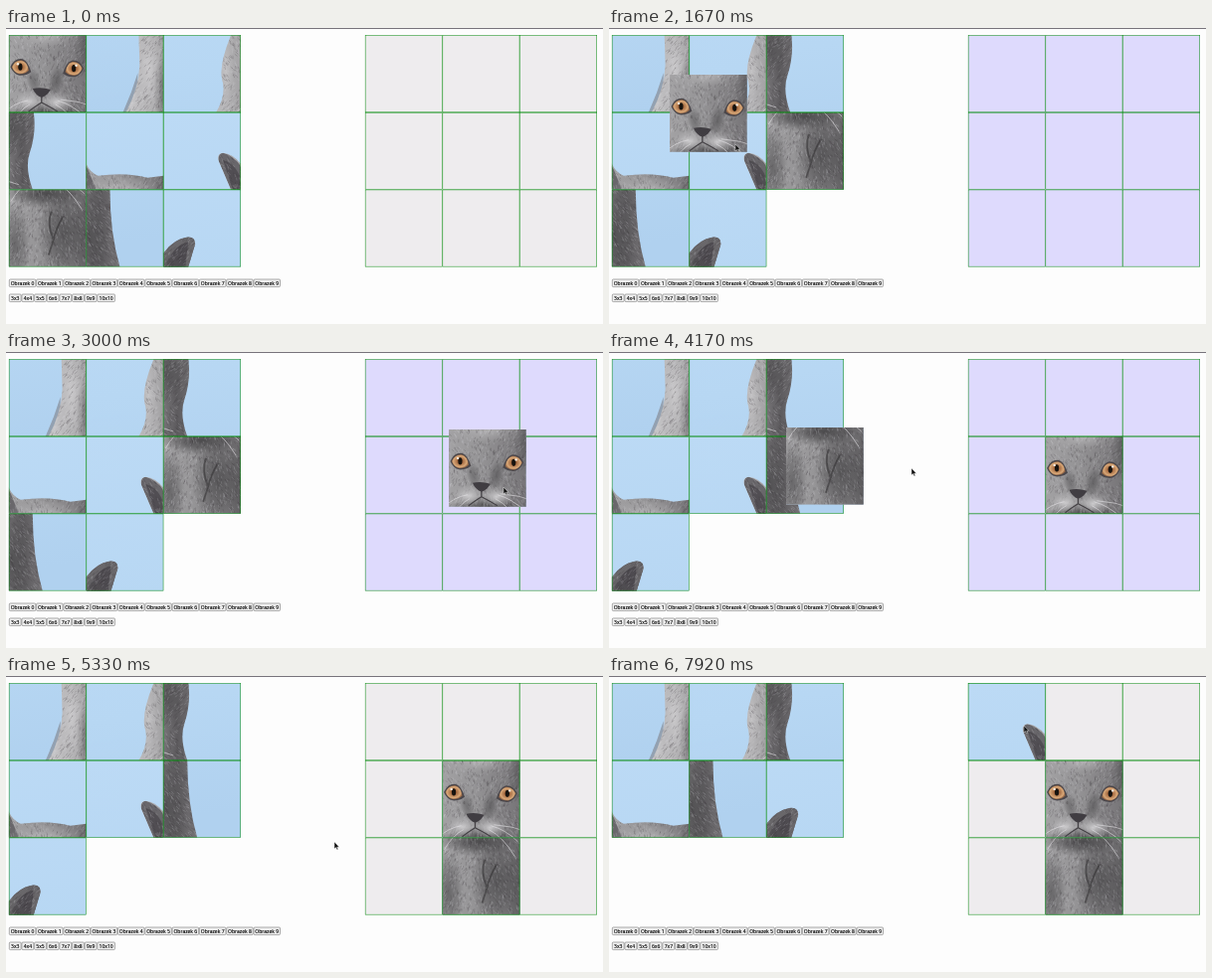
Recreate the animation shown at these times as an HTML page. Size 600 by 298 pixels, loop 8 s.

```html
<!DOCTYPE html>
<html lang="pl">
<head>
<meta charset="utf-8">
<title>Puzzle</title>
<style>
  html, body { margin: 0; width: 100%; height: 100%; overflow: hidden; background: #fdfdfd; }
  #stage { display: block; width: 600px; height: 298px; }
  .border { fill: none; stroke: #008a08; stroke-width: .5; }
  .button rect { fill: #efefef; stroke: #777; stroke-width: .6; }
  .button text { font: 5px "Noto Sans", "Open Sans", sans-serif; fill: #000; stroke: #000; stroke-width: .12; text-anchor: middle; }
  .hair { fill: none; stroke-width: .7; stroke-linecap: round; }
</style>
</head>
<body>
<svg id="stage" viewBox="0 0 600 298">
  <defs>
    <linearGradient id="sky" x2=".15" y2="1">
      <stop stop-color="#bcdaf5"/><stop offset=".5" stop-color="#b7d7f3"/><stop offset="1" stop-color="#b0d1ef"/>
    </linearGradient>
    <linearGradient id="fur" gradientUnits="userSpaceOnUse" x1="46" x2="190">
      <stop stop-color="#c4c3c5"/><stop offset=".22" stop-color="#a3a2a4"/>
      <stop offset=".45" stop-color="#949395"/><stop offset=".76" stop-color="#777578"/>
      <stop offset=".86" stop-color="#5d5b5e"/><stop offset="1" stop-color="#757376"/>
    </linearGradient>
    <radialGradient id="shade">
      <stop stop-color="#4b4a4c"/><stop offset=".5" stop-color="#555456" stop-opacity=".7"/>
      <stop offset="1" stop-color="#59585a" stop-opacity="0"/>
    </radialGradient>
    <radialGradient id="glow">
      <stop stop-color="#cbcacc"/><stop offset="1" stop-color="#b4b3b5" stop-opacity="0"/>
    </radialGradient>
    <radialGradient id="iris">
      <stop offset=".3" stop-color="#a4683f"/><stop offset=".8" stop-color="#d8a878"/><stop offset="1" stop-color="#9a6a48"/>
    </radialGradient>
    <path id="body" d="M56 50Q53 42 60 41Q70 42 78 52Q82 61 90 64Q118 60 140 66L156 64Q166 50 180 48Q188 47 188 55L181 78Q184 98 177 119Q172 134 180 156Q180 200 190 234H40Q53 210 54 186L53 156Q64 138 59 122Q56 108 68 78Z"/>
    <clipPath id="bodyClip"><use href="#body"/></clipPath>
    <g id="eye">
      <path d="M-10 0Q-6-9 2-8Q8-6 11 5Q6 9-1 8.5Q-7 7-10 0Z" fill="#4a464a"/>
      <path d="M-8.6 0Q-5-7.4 1.5-6.6Q7-5 8.6 3.6Q5 7.4-1 7.2Q-6 6-8.6 0Z" fill="url(#iris)"/>
      <ellipse rx="2.1" ry="3.6" fill="#17130f"/>
      <circle cx="-2.4" cy="-3" r="1.2" fill="#f6eee4"/>
    </g>
    <g id="cat">
      <rect width="234" height="234" fill="url(#sky)"/>
      <path d="M37 234Q46 214 52 194V234Z" fill="#93a1b1"/>
      <use href="#body" fill="url(#fur)"/>
      <g clip-path="url(#bodyClip)">
        <path d="M56 50Q54 42 60 41Q72 44 80 58L88 78H68Z" fill="#69676b"/>
        <path d="M60 48Q70 51 76 62L78 78H70Z" fill="#514e53"/>
        <path d="M156 65Q168 49 182 48Q188 49 188 55L181 82H156Z" fill="#69676a"/>
        <path d="M159 74Q168 55 181 53L178 78H162Z" fill="#4e4b50"/>
        <ellipse cx="116" cy="78" rx="38" ry="15" fill="url(#glow)" opacity=".6"/>
        <ellipse cx="63" cy="115" rx="9" ry="42" fill="url(#glow)" opacity=".7"/>
        <ellipse cx="63" cy="190" rx="16" ry="54" fill="url(#glow)"/>
        <ellipse cx="117" cy="160" rx="42" ry="15" fill="url(#shade)"/>
        <ellipse cx="134" cy="200" rx="28" ry="48" fill="url(#shade)" opacity=".8"/>
        <ellipse cx="84" cy="212" rx="16" ry="45" fill="url(#shade)" opacity=".65"/>
        <ellipse cx="160" cy="205" rx="20" ry="65" fill="url(#shade)" opacity=".75"/>
        <ellipse cx="160" cy="92" rx="16" ry="32" fill="url(#shade)" opacity=".7"/>
        <path id="darkHair" class="hair" stroke="#343235" opacity=".28"/>
        <path id="lightHair" class="hair" stroke="#e2e1e3" opacity=".24"/>
        <path d="M121 178Q116 190 123 207M133 183Q126 194 123 207L118 222" fill="none" stroke="#343235" stroke-width="1.8" opacity=".6"/>
        <ellipse cx="103" cy="124" rx="7" ry="15" fill="url(#shade)" opacity=".5" transform="rotate(-14 103 124)"/>
        <ellipse cx="126" cy="124" rx="8" ry="16" fill="url(#shade)" opacity=".6" transform="rotate(14 126 124)"/>
        <ellipse cx="98" cy="145" rx="17" ry="11" fill="url(#glow)"/>
        <ellipse cx="126" cy="146" rx="17" ry="11" fill="url(#glow)"/>
        <path d="M102 132Q111 130 120 133Q117 139 111 141Q105 139 102 132Z" fill="#403d42"/>
        <path d="M111 140V146Q106 149 98 155M111 146Q117 149 127 155" fill="none" stroke="#454246" stroke-width="1.3"/>
        <path d="M97 144Q84 146 72 157M99 148Q88 154 80 168M127 144Q142 148 154 160M125 148Q139 155 151 175M130 143Q149 144 166 151" fill="none" stroke="#e6e5e7" stroke-width=".6"/>
      </g>
      <use href="#eye" x="89.5" y="110"/>
      <use href="#eye" transform="translate(143.5 111.5) scale(-1 1)"/>
    </g>
  </defs>
  <rect width="600" height="298" fill="#fdfdfd"/>
  <rect width="600" height="1" fill="#77737b"/>
  <g id="cells"></g>
  <g id="buttons"></g>
  <g id="tiles"></g>
  <path id="cursor" d="M0 0V7L1.6 5.6L2.7 8L3.8 7.5L2.7 5.2H4.9Z" fill="#111" stroke="#fff" stroke-width=".4"/>
</svg>
<script>
const SIZE = 77.7, TOP = 7.3, LEFT = 2.9, RIGHT = 360.9;
const STEPS = 96, LOOP = 8000;
const byId = id => document.getElementById(id);

function add(parent, tag, attrs = {}) {
  const node = document.createElementNS("http://www.w3.org/2000/svg", tag);
  for (const key in attrs) node.setAttribute(key, attrs[key]);
  return parent.appendChild(node);
}
const addBorder = (parent, x = 0, y = 0) => add(parent, "rect",
  { class: "border", x: x + .25, y: y + .25, width: SIZE - .5, height: SIZE - .5 });
const slot = (left, i) => [left + i % 3 * SIZE, TOP + Math.floor(i / 3) * SIZE];

// Short seeded fur strokes
let seed = 7;
const random = () => (seed = seed * 16807 % 2147483647) / 2147483647;
function hairs(count) {
  let d = "";
  for (let i = 0; i < count; i++) {
    const x = 40 + random() * 152, y = 42 + random() * 192;
    const dx = (x - 112) * .03 + random() * 2 - 1, dy = (y < 125 ? -1 : 1) * (1 + random() * 2);
    d += `M${x.toFixed(1)} ${y.toFixed(1)}l${dx.toFixed(1)} ${dy.toFixed(1)}`;
  }
  return d;
}
byId("darkHair").setAttribute("d", hairs(2000));
byId("lightHair").setAttribute("d", hairs(1600));

const cells = Array.from({ length: 9 }, (_, i) => {
  const [x, y] = slot(RIGHT, i);
  const cell = add(byId("cells"), "rect", { x, y, width: SIZE, height: SIZE });
  addBorder(byId("cells"), x, y);
  return cell;
});

function addButton(x, y, width, label) {
  const g = add(byId("buttons"), "g", { class: "button" });
  add(g, "rect", { x: x + .4, y, width: width - .8, height: 7.6, rx: 1 });
  add(g, "text", { x: x + width / 2, y: y + 5.6 }).textContent = label;
}
for (let i = 0; i < 10; i++) addButton(2.9 + i * 27.3, 253, 27.3, "Obrazek " + i);
for (let n = 3; n <= 10; n++) addButton(2.9 + (n - 3) * 12.65, 268, n < 10 ? 12.65 : 18.4, `${n}x${n}`);

// Picture part held by each tile, in starting order
const parts = [4, 6, 3, 5, 1, 0, 7, 8, 2];
const tiles = parts.map(part => {
  const group = add(byId("tiles"), "g");
  const view = add(group, "svg", {
    width: SIZE, height: SIZE, viewBox: `${part % 3 * 78} ${Math.floor(part / 3) * 78} 78 78`
  });
  add(view, "use", { href: "#cat" });
  return { part, group, border: addBorder(group), drag: null };
});

// Rows are [step, x, y]; a drag lasts from its first row to its last
const drags = [
  { tile: 0, path: [[17, 2.9, 7.3], [20, 61, 47], [30, 330, 74], [36, 445, 78], [39, 440, 84]] },
  { tile: 6, path: [[49, 158.3, 85], [50, 178, 76], [51, 262, 82], [60, 440, 166], [61, 439, 165]] },
  { tile: 5, path: [[79, 80.6, 85], [80, 82, 85], [91, 361, 9], [93, 361, 7.5]] }
];
for (const drag of drags) {
  tiles[drag.tile].drag = drag;
  drag.start = drag.path[0][0];
  drag.end = drag.path.at(-1)[0];
}
const cursorPath = [
  [0, 98, 310], [1, 98, 284], [10, 98, 262], [15, 62, 72], [17, 62, 72], [20, 127, 117],
  [30, 386, 134], [36, 500, 136], [39, 498, 144], [42, 470, 140], [48, 198, 124], [49, 205, 123],
  [50, 304, 117], [60, 495, 205], [61, 492, 208], [64, 330, 167], [70, 150, 140], [79, 145, 130],
  [80, 146, 130], [91, 418, 52], [95, 417, 50]
];

function at(path, step) {
  const i = path.findIndex(row => row[0] > step);
  if (i < 0) return path.at(-1).slice(1);
  if (i === 0) return path[0].slice(1);
  const [a, ax, ay] = path[i - 1], [b, bx, by] = path[i];
  const k = (step - a) / (b - a);
  return [ax + (bx - ax) * k, ay + (by - ay) * k];
}
const move = (node, [x, y]) => node.setAttribute("transform", `translate(${x.toFixed(2)} ${y.toFixed(2)})`);

function draw(step) {
  let next = 0, dragging = false;
  for (const { part, group, border, drag } of tiles) {
    const held = drag && step >= drag.start && step < drag.end;
    if (held) {
      dragging = true;
      move(group, at(drag.path, step));
      byId("tiles").append(group);
    } else {
      move(group, drag && step >= drag.end ? slot(RIGHT, part) : slot(LEFT, next++));
    }
    border.setAttribute("visibility", held ? "hidden" : "visible");
  }
  for (const cell of cells) cell.setAttribute("fill", dragging ? "#dedafd" : "#eeecee");
  move(byId("cursor"), at(cursorPath, step));
}

const began = performance.now();
let shown = -1;
function tick() {
  const time = (performance.now() - began) % LOOP;
  const step = Math.floor(time / LOOP * STEPS + .1) % STEPS;
  if (step !== shown) draw(shown = step);
  requestAnimationFrame(tick);
}
tick();
</script>
</body>
</html>
```
